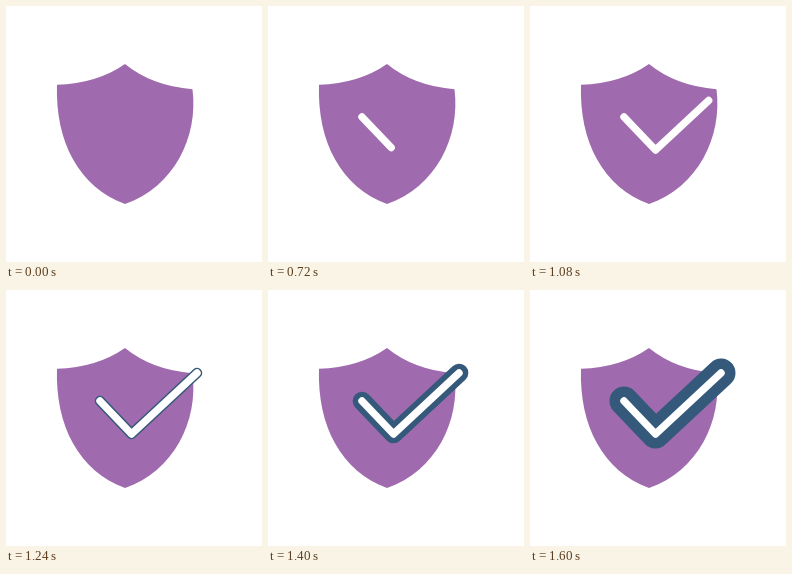
An HTML page with a canvas for the animation above (5 s loop, 256x256 px).

```html
<!DOCTYPE html>
<html lang="en">
<head>
<meta charset="utf-8">
<title>Shield check</title>
<style>
html, body { margin: 0; width: 100%; height: 100%; overflow: hidden; background: #fff; }
canvas { display: block; width: 100vw; height: 100vh; }
</style>
</head>
<body>
<canvas id="stage" width="256" height="256"></canvas>
<script>
const ctx = document.getElementById('stage').getContext('2d');
const LOOP = 5000, STEP = 40;
const PURPLE = '#9f6bae', NAVY = '#34597a', WHITE = '#fff';
const LINE = 7.4, OUTLINE = 29;

const shield = new Path2D(
  'M119 58 Q146 80 186.5 83.2 C192.5 131 168 181 119 198 ' +
  'C73.5 181.5 49 136 51 78.8 Q91 77.5 119 58 Z');

const tick = [[94, 111], [125.5, 144], [191, 83]];
const dist = (a, b) => Math.hypot(b[0] - a[0], b[1] - a[1]);
const tickLength = dist(tick[0], tick[1]) + dist(tick[1], tick[2]);

// Linear progress from 0 to 1 between two times
const ramp = (t, from, to) => Math.min(1, Math.max(0, (t - from) / (to - from)));

function strokeTick(part, width, color) {
  let left = Math.max(0.01, part * tickLength);
  ctx.beginPath();
  ctx.moveTo(...tick[0]);
  for (let i = 1; i < tick.length && left > 0; i++) {
    const [a, b] = [tick[i - 1], tick[i]];
    const len = dist(a, b);
    const k = Math.min(1, left / len);
    ctx.lineTo(a[0] + (b[0] - a[0]) * k, a[1] + (b[1] - a[1]) * k);
    left -= len;
  }
  ctx.lineWidth = width;
  ctx.strokeStyle = color;
  ctx.stroke();
}

function draw(t) {
  ctx.fillStyle = WHITE;
  ctx.fillRect(0, 0, 256, 256);
  ctx.fillStyle = PURPLE;
  ctx.fill(shield);
  if (t < 520) return;

  ctx.lineCap = ctx.lineJoin = 'round';
  const outline = ramp(t, 1180, 1600);
  if (outline > 0) strokeTick(1, LINE + (OUTLINE - LINE) * outline, NAVY);
  strokeTick(ramp(t, 520, 1160), LINE, WHITE);
}

function frame() {
  const t = performance.now() % LOOP;
  draw(Math.floor(t / STEP) * STEP);
  requestAnimationFrame(frame);
}
frame();
</script>
</body>
</html>
```
